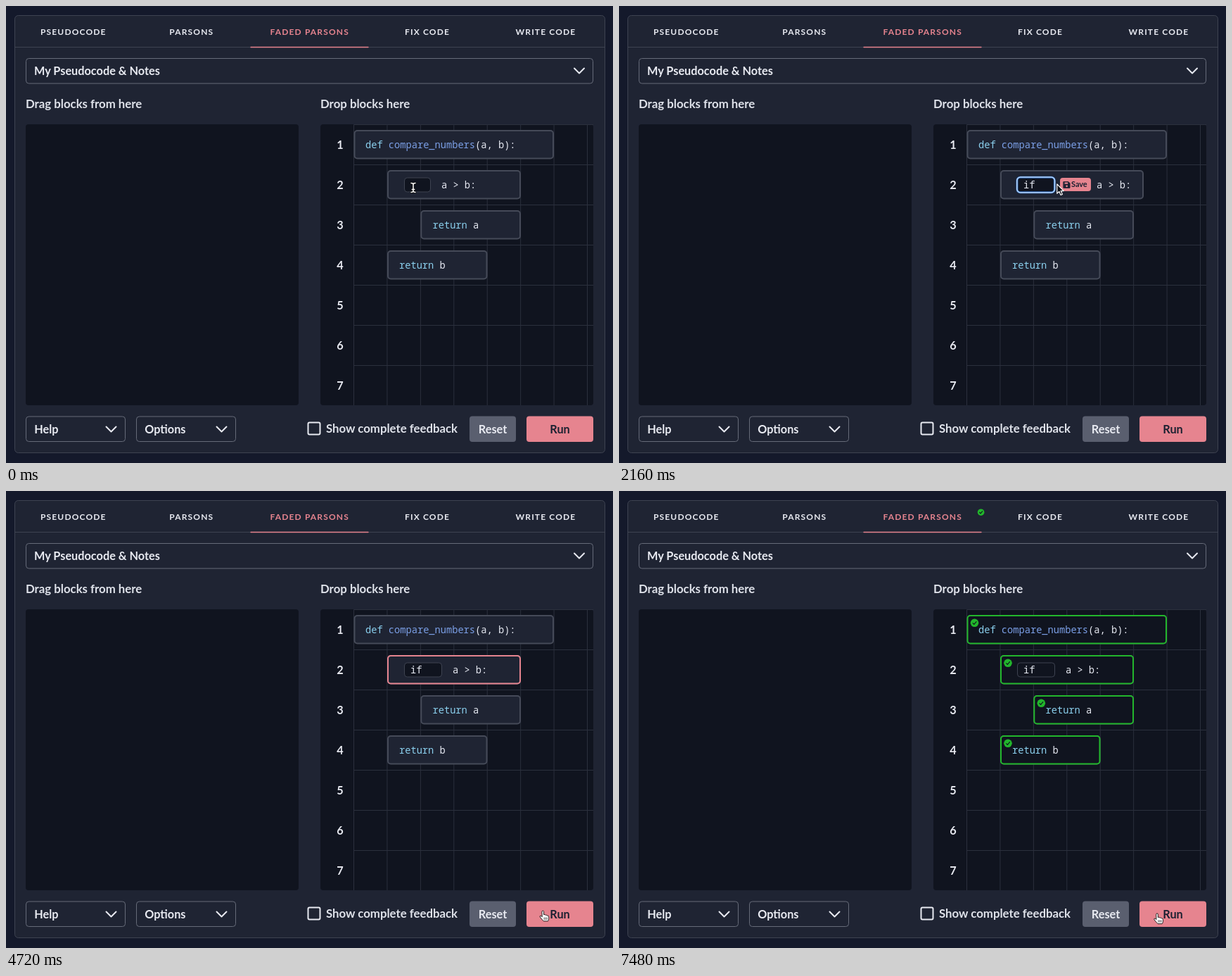
These frames come from a looping animation (863x649 px, 7.76 s). An HTML page:

```html
<!DOCTYPE html>
<html lang="en">
<head>
<meta charset="utf-8">
<title>Block puzzle</title>
<style>
  html, body { margin: 0; width: 100%; height: 100%; overflow: hidden; background: #14192b; }
  svg { display: block; }
  text { font: 700 16.3px Lato, sans-serif; fill: #e8eaf1; white-space: pre; }
  .tab { font-size: 12px; letter-spacing: 1.15px; }
  .heading { font-size: 16.8px; fill: #dfe2ea; }
  .code { font: 400 13.7px "Noto Sans Mono", monospace; fill: #e6e9f2; }
  .save { font-size: 10.9px; }
  .dark { fill: #1c2131; }
  .keyword { fill: #8bd0ee; }
  .name { fill: #7b9fe6; }
</style>
</head>
<body>
<svg width="863" height="649" viewBox="0 0 863 649">
  <g id="back"></g>
  <g id="live"></g>
</svg>
<script>
const LOOP = 7760;
const PANEL = '#1f2433', WELL = '#10141f', PINK = '#e6848f', GREEN = '#22b62c', EDGE = '#454a58';

// Moments in ms
const FOCUS = 540, TYPE_I = 1060, TYPE_F = 1280, TO_SAVE = 1700, AT_SAVE = 2400,
      BLUR = 2820, SAVED = 3180, TO_RUN = 4040, AT_RUN = 4800, RUN = 4920, DONE = 6520;

const clamp = v => Math.max(0, Math.min(1, v));
const ramp = (t, start, end) => clamp((t - start) / (end - start));

const rect = (x, y, w, h, r, fill, stroke = 'none', width = 1) =>
  `<rect x="${x}" y="${y}" width="${w}" height="${h}" rx="${r}" fill="${fill}" stroke="${stroke}" stroke-width="${width}"/>`;
const text = (x, y, s, cls = '', anchor = 'start') =>
  `<text x="${x}" y="${y}" class="${cls}" text-anchor="${anchor}">${s}</text>`;
const path = (d, stroke, width = 1, fill = 'none') =>
  `<path d="${d}" stroke="${stroke}" stroke-width="${width}" fill="${fill}" stroke-linecap="round" stroke-linejoin="round"/>`;
const group = (opacity, s) => opacity > 0 ? `<g opacity="${opacity}">${s}</g>` : '';
const at = (x, y, s) => `<g transform="translate(${x} ${y})">${s}</g>`;
const chevron = (x, y) => path(`M${x - 7} ${y - 3.5}l7 7l7-7`, '#e8eaf1', 2);
const span = (cls, s) => `<tspan class="${cls}">${s}</tspan>`;

const badge = (x, y, r) => `<circle cx="${x}" cy="${y}" r="${r}" fill="${GREEN}"/>` +
  path(`M${x - r * .42} ${y + r * .05}l${r * .3} ${r * .32}l${r * .55}-${r * .65}`, WELL, 1.1);

function backdrop() {
  let s = rect(12.5, 13.5, 839, 621, 5, PANEL, '#3e4351') +
    path('M13 58.5H851', '#3e4351') + path('M348 58.5H515', PINK, 1.3);

  [[49, 'PSEUDOCODE'], [232.3, 'PARSONS'], [567, 'FIX CODE'], [724.5, 'WRITE CODE']]
    .forEach(([x, label]) => s += text(x, 41, label, 'tab'));
  s += `<text x="375.5" y="41" class="tab" style="fill:${PINK}">FADED PARSONS</text>`;

  s += rect(28.5, 74.5, 806, 35.5, 4, PANEL, '#666b79') + text(40, 98.3, 'My Pseudocode &amp; Notes') + chevron(815, 92);
  s += text(28, 145, 'Drag blocks from here', 'heading') + text(447, 145, 'Drop blocks here', 'heading');
  s += rect(28, 168, 388, 399, 4, WELL) + rect(447, 168, 388, 399, 4, WELL);

  let grid = 'M494.5 168.5H835';
  for (let i = 0; i < 8; i++) grid += `M${494.5 + i * 47.43} 168.5V567`;
  for (let i = 1; i < 7; i++) grid += `M494.5 ${168.5 + i * 57}H835`;
  s += `<path d="${grid}" stroke="#2b303d" fill="none"/>`;
  for (let i = 0; i < 7; i++) s += text(475, 202.5 + i * 57, i + 1, '', 'middle');

  [[28.5, 'Help'], [185.5, 'Options']].forEach(([x, label]) =>
    s += rect(x, 583, 141, 35.5, 4, PANEL, '#666b79') + text(x + 11.7, 606.5, label) + chevron(x + 121, 601));
  return s;
}

function block(row, x, w, content, correct, selected = 0) {
  const y = 177 + row * 57;
  const frame = (fill, stroke) => rect(x, y, w, 39.5, 4, fill, stroke, 2);
  return frame(PANEL, EDGE) + group(selected, frame('none', PINK)) +
    group(correct, frame(WELL, GREEN) + badge(x + 10, y + 10.3, 5.8)) + content;
}

function saveButton(x) {
  return rect(x, 244, 44, 19, 4, PINK) +
    path(`M${x + 5.2} 249.7h6.8l2 2v6.6h-8.8z`, '#1c2131', 1, '#1c2131') +
    rect(x + 6.6, 250.5, 4.6, 2.2, 0, PINK) +
    `<circle cx="${x + 9.6}" cy="255.8" r="1.4" fill="${PINK}"/>` +
    text(x + 16, 257.4, 'Save', 'save dark');
}

function blankLine(t, correct) {
  const typed = t < TYPE_I ? '' : t < TYPE_F ? 'i' : 'if';
  const editing = t >= FOCUS && t < BLUR;
  const unsaved = t >= TYPE_I && t < SAVED;
  const end = 603.5 + typed.length * 8;
  const lastKey = t < TYPE_I ? FOCUS : t < TYPE_F ? TYPE_I : TYPE_F;
  const caretOn = editing && (t - lastKey) % 1000 < 500;

  let s = editing
    ? rect(566, 243.3, end - 566.2, 21.4, 4.5, WELL, '#2f67b5', 3) +
      rect(565.8, 243, end - 565.8, 22, 5, 'none', '#b9d8fb', 1.6)
    : rect(566.5, 244, end - 566.5, 20, 4, WELL, '#3e4351');
  s += text(575, 258.5, typed, 'code');
  if (caretOn) s += path(`M${575.7 + typed.length * 8.22} 247.5V261`, '#fff');
  if (unsaved) s += saveButton(end + 7.5);
  s += text(end + (unsaved ? 59.5 : 15.5), 258.5, 'a &gt; b:', 'code');

  const width = unsaved ? end - 417.5 : 188;
  const selected = ramp(t, SAVED, SAVED + 100) * (1 - ramp(t, RUN, RUN + 150));
  return block(1, 543, Math.max(188, width), s, correct, selected);
}

function footer(t) {
  const running = t >= RUN && t < DONE;
  const dx = running ? -4 : 0;
  const run = rect(740 + dx, 582.5, 95 - dx, 36.5, 4, PINK) +
    text(787.5 + dx / 2, 606.5, running ? 'Running...' : 'Run', 'dark', 'middle');
  const dim = ramp(t, RUN, RUN + 150) * (1 - ramp(t, DONE, DONE + 150));
  return at(dx, 0, rect(429.5, 591.5, 17, 17, 2, 'none', '#e8eaf1', 2) +
      text(455, 606.3, 'Show complete feedback', 'heading') +
      rect(659, 582.5, 66, 36.5, 4, '#5a5f6f') + text(692, 606.5, 'Reset', '', 'middle')) +
    group(1 - dim / 2, run);
}

const shapes = {
  beam: [4.2, 2].map((w, i) =>
    path('M-3-6.5Q-.4-6.5 0-4.7Q.4-6.5 3-6.5M0-4.7V4.7M-3 6.5Q-.4 6.5 0 4.7Q.4 6.5 3 6.5M-1.7 2.6H1.7',
      i ? '#fff' : '#111', w * .75)).join(''),
  arrow: path('M0 0V13.4L3.1 10.6L5.3 15.6L7.6 14.6L5.4 9.7H9.4Z', '#fff', 1.2, '#0b0d14'),
  hand: path('M-1.3 1.2a1.3 1.3 0 0 1 2.6 0V5.5q2-.8 2.6.6q1.9-.6 2.4.8q2.1-.3 2.1 1.6V11q0 2-1.2 3.6H1Q-1.5 12-4 8.8q-.8-1.7 1-1.8l1.7 1.3Z', '#111', .9, '#fff') +
    path('M1.9 9.6v2.8M3.9 9.6v2.8M5.9 9.6v2.8', '#111', .7)
};

function cursor(t) {
  if (t < TO_RUN) {
    const u = ramp(t, TO_SAVE, AT_SAVE), e = u * u * (3 - 2 * u);
    const x = 579 + 60 * e, y = 258 - 7 * e;
    return at(x, y, x < 619 ? shapes.beam : x < 627 ? shapes.arrow : shapes.hand);
  }
  const u = ramp(t, TO_RUN, AT_RUN), e = 1 - (1 - u) ** 2;
  const x = 639 + 126 * e ** 1.26, y = 251 + 349 * e;
  return at(x, y, y < 275 || y > 582 ? shapes.hand : shapes.arrow);
}

function scene(t) {
  const correct = ramp(t, DONE, DONE + 200);
  return group(correct, badge(514.6, 30.2, 4.8)) +
    block(0, 495.5, 282.5, text(511, 201.5,
      span('keyword', 'def') + ' ' + span('name', 'compare_numbers') + '(a, b):', 'code'), correct) +
    blankLine(t, correct) +
    block(2, 590.3, 140.7, text(606.5, 315.5, span('keyword', 'return') + ' a', 'code'), correct) +
    block(3, 543, 140.5, text(559, 372.5, span('keyword', 'return') + ' b', 'code'), correct) +
    footer(t) + cursor(t);
}

const live = document.getElementById('live');
document.getElementById('back').innerHTML = backdrop();

const start = performance.now();
function draw(now) {
  live.innerHTML = scene(Math.max(0, now - start) % LOOP);
  requestAnimationFrame(draw);
}
draw(start);
</script>
</body>
</html>
```
